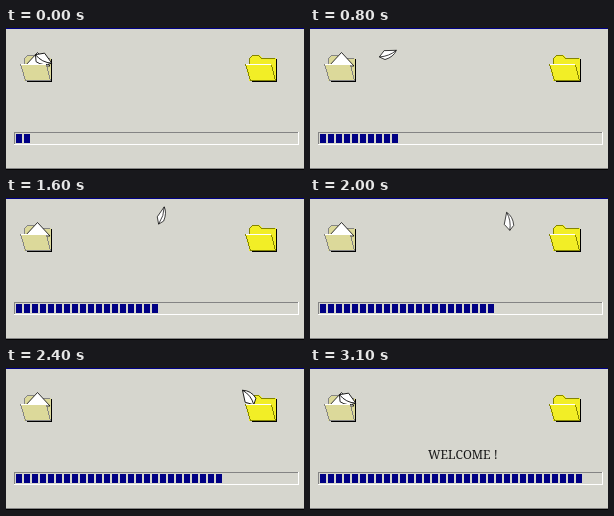
An HTML page for the animation above (3900 ms loop, 298 px wide and 142 px high).

```html
<!DOCTYPE html>
<html lang="en">
<head>
<meta charset="utf-8">
<title>Copying</title>
<style>
html, body { margin: 0; width: 100%; height: 100%; overflow: hidden; background: #d6d6ce; }
svg { display: block; width: 298px; height: 142px; }
.sheet { fill: #fff; stroke: #000; stroke-width: .8; stroke-linejoin: round; shape-rendering: auto; }
text { font: 12px "Noto Serif", serif; fill: #181818; }
</style>
</head>
<body>
<svg viewBox="0 0 298 142" shape-rendering="crispEdges">
  <rect width="298" height="142" fill="#d6d6ce"/>
  <rect width="298" height="1" fill="#000084"/>
  <rect y="140" width="298" height="1" fill="#848484"/>
  <rect y="141" width="298" height="1" fill="#000"/>
  <path d="M8.5 116V104.5H292" fill="none" stroke="#848484"/>
  <path d="M8 116.5H292.5V104" fill="none" stroke="#fff"/>
  <g id="backs"></g>
  <path class="sheet" d="M19 38L31.5 24.5L44 38Z"/>
  <g class="sheet" id="sheet">
    <path d="M-9 1L-3 -6L9 -3Q5 5 -4 6Z"/>
    <path d="M-9 1Q1 3 9 -3" fill="none"/>
  </g>
  <g id="fronts"></g>
  <g id="bars" fill="#000084"></g>
  <text id="label" x="118" y="91">WELCOME !</text>
</svg>
<script>
const LOOP = 3900, STEP = 100, LAST = 3100;
const FLIGHT = 2700, RETURN = 3000, WELCOME = 2700;
const LEG = 400;
const stops = [37, 50, 78, 134, 156, 199, 243, 260]; // sheet x after each leg
const $ = id => document.getElementById(id);

function add(parent, tag, attrs) {
  const el = document.createElementNS("http://www.w3.org/2000/svg", tag);
  for (const key in attrs) el.setAttribute(key, attrs[key]);
  return parent.appendChild(el);
}

function folder(x, fill, edge) {
  const transform = `translate(${x} 27)`;
  const line = (group, d, stroke) =>
    add(group, "path", { d, stroke, fill: "none", transform });
  const back = $("backs"), front = $("fronts");
  add(back, "path", { d: "M4 26V3L7 0H14L17 3H31V26Z", fill, transform });
  line(back, "M4.5 10V3.5L7.5 .5H13.5L16.5 3.5H30", edge);
  line(back, "M31.5 4V26.5H7", "#000");
  add(front, "path", { d: "M0 9H26L31 26H5Z", fill, transform });
  line(front, "M1 9.5H26", "#fff");
  line(front, "M.5 9L5.5 25.5", edge);
  line(front, "M26.5 10L30.5 25.5H5", edge);
}

folder(14, "#dcd99a", "#848484");
folder(239, "#f2ee26", "#848400");

const bars = Array.from({ length: 2 + LAST / STEP }, (_, i) =>
  add($("bars"), "rect", { x: 10 + 8 * i, y: 106, width: 6, height: 9 }));

const show = (el, on) => el.setAttribute("visibility", on ? "visible" : "hidden");

// The sheet climbs to mid-stage, sinks again, and turns at a steady rate.
function placeSheet(t) {
  const leg = Math.floor(t / LEG);
  const x = stops[leg] + (stops[leg + 1] - stops[leg]) * (t % LEG) / LEG;
  const y = 17 + 0.13 * Math.abs(x - 150);
  const angle = 40 - 0.065 * t;
  const width = 0.8 + 0.2 * Math.cos(2 * Math.PI * t / FLIGHT);
  $("sheet").setAttribute("transform",
    `translate(${x} ${y}) rotate(${angle}) scale(1 ${width})`);
}

function draw(now) {
  let t = Math.floor((now % LOOP) / STEP) * STEP;
  if (t === 2500 || t === 2900) t -= STEP; // short pauses
  t = Math.min(t, LAST);
  const back = t >= RETURN;
  placeSheet(back ? 0 : Math.min(t, FLIGHT));
  show($("sheet"), back || t <= FLIGHT);
  show($("label"), t >= WELCOME);
  bars.forEach((bar, i) => show(bar, i < 2 + t / STEP));
}

const start = performance.now();
function tick() {
  draw(performance.now() - start);
  requestAnimationFrame(tick);
}
tick();
</script>
</body>
</html>
```
